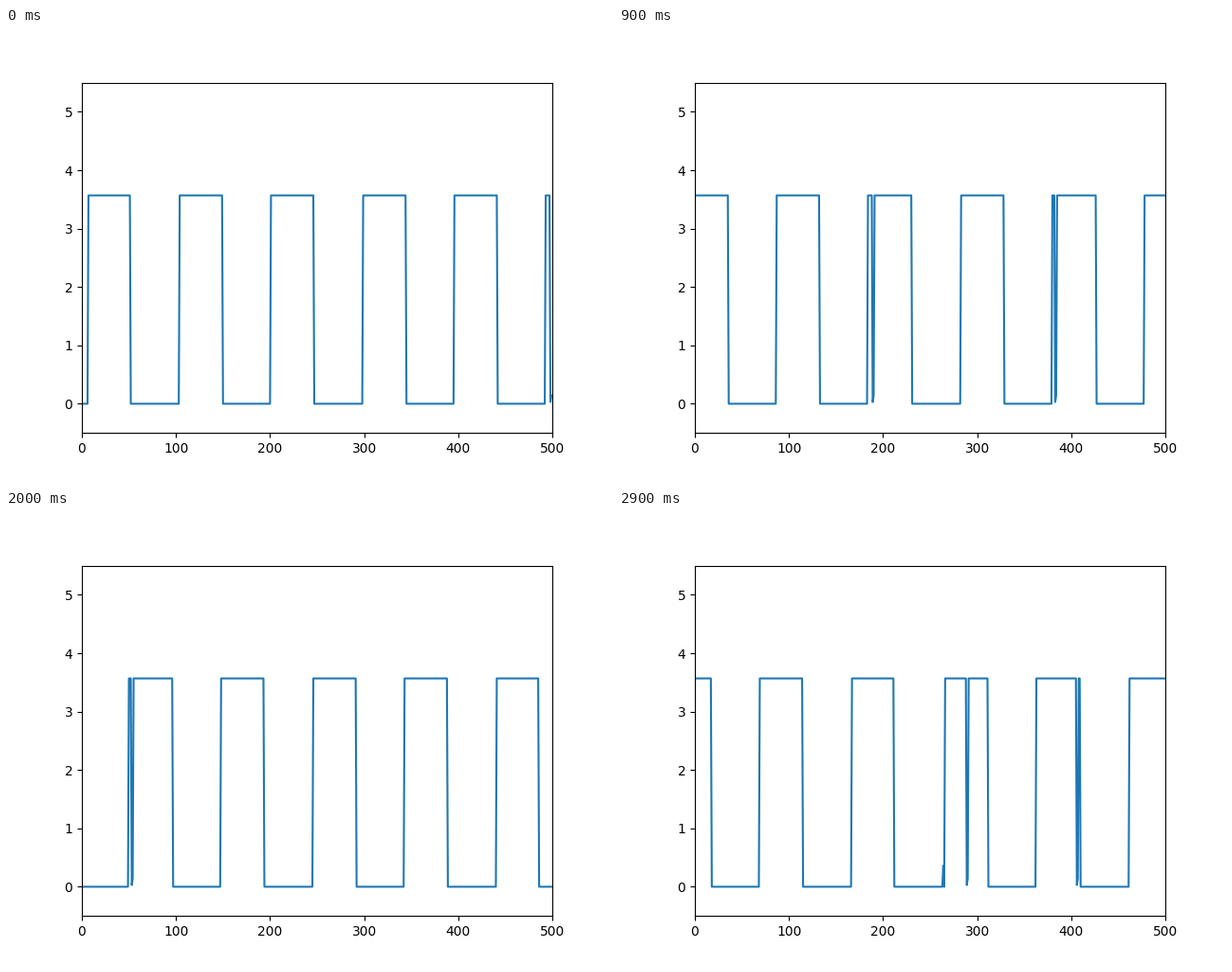
Animation, 640 px wide and 480 px high, one loop 3 s. Source, as a matplotlib script:

```python
import matplotlib.pyplot as plt
import numpy as np
from matplotlib.animation import FuncAnimation

WINDOW = 500
FRAMES = 30
HIGH = 3.568

# Square wave, in samples
PERIOD = 97.34
PULSE = 45.72
FIRST_RISE = 6.27

# Samples at which the reading briefly fails
DROPOUTS = [498, 692, 1202, 1319]
BLIP = 1177

# Scroll path: (frame, samples passed); the first step is a double one
SCROLL = [(0, 0), (1, 62), (4, 155), (9, 309),
          (13, 426), (20, 639), (26, 820), (29, 913)]


def make_signal(count):
    """Square wave whose clock loses one sample at every failed reading."""
    sample = np.arange(count)
    lost = np.searchsorted(sorted(DROPOUTS + [BLIP]), sample)
    phase = (sample - lost - FIRST_RISE) % PERIOD
    signal = np.where(phase < PULSE, HIGH, 0.0)
    for start in DROPOUTS:
        signal[start:start + 2] = 0.03, 0.14
    signal[BLIP:BLIP + 2] = 0.36, 0
    return signal


shifts = np.rint(np.interp(range(FRAMES), *zip(*SCROLL))).astype(int)
signal = make_signal(shifts[-1] + WINDOW)

fig, ax = plt.subplots(figsize=(6.4, 4.8), dpi=100)
ax.set_xlim(0, WINDOW)
ax.set_ylim(-0.5, 5.5)
line, = ax.plot(np.arange(WINDOW), signal[:WINDOW])


def update(frame):
    start = shifts[frame]
    line.set_ydata(signal[start:start + WINDOW])
    return line,


anim = FuncAnimation(fig, update, frames=FRAMES, interval=100, repeat=True)
plt.show()
```
